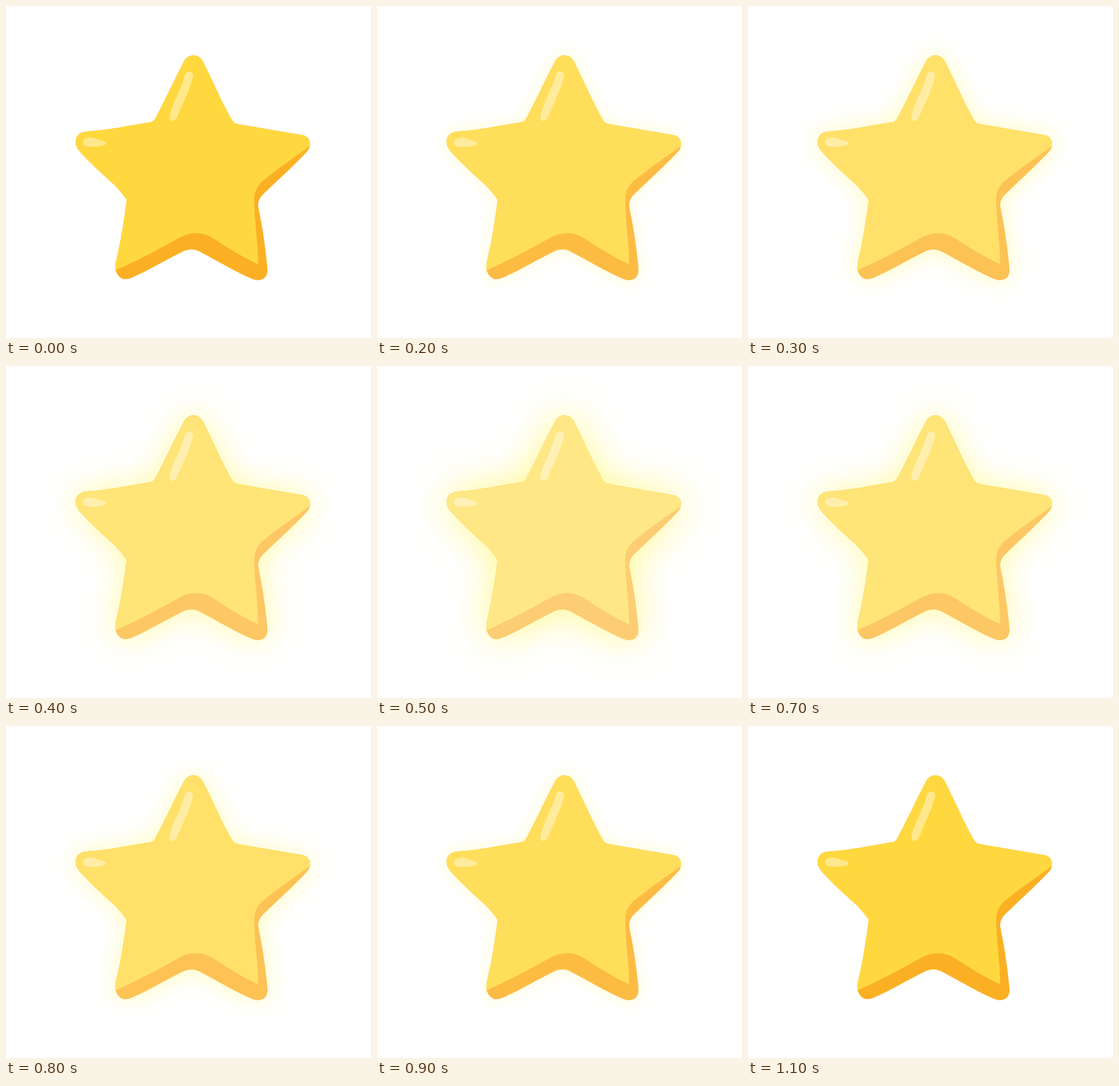
These frames come from a looping animation (550x500 px, 1.15 s). An HTML page with a canvas:

```html
<!DOCTYPE html>
<html lang="en">
<head>
<meta charset="utf-8">
<title>Glowing star</title>
<style>
  html, body { margin: 0; width: 100%; height: 100%; overflow: hidden; background: #fff; }
  canvas { display: block; }
</style>
</head>
<body>
<canvas id="stage" width="550" height="500"></canvas>
<script>
const ctx = document.getElementById('stage').getContext('2d');
const STEP = 50, STEPS = 23, PEAK = 11;

const star = new Path2D(`M267 86 C273 71 291 70 298 86
  C312 114 326 147 340 171 Q343 177 350 178 L444 194
  C455 195 459 202 458 211 Q457 216 452 221
  C434 240 410 262 389 282 Q379 291 380 302
  C386 330 391 362 394 396 C395 411 383 416 371 411
  C345 400 319 384 294 371 Q281 363 268 369
  C243 381 217 397 190 409 C176 415 169 409 165 398
  Q164 391 167 379 C174 350 178 321 182 292
  Q176 283 164 270 C146 254 127 237 111 219
  C100 206 104 190 122 189 C153 187 187 180 217 175
  Q221 175 224 171 C239 144 252 114 267 86 Z`);

const face = new Path2D(`M90 60 H470 V203 L458 211
  C432 230 407 246 384 266 Q374 276 374 291
  C374 323 380 357 380 389 C358 379 335 365 314 351
  C297 340 280 339 263 348 C231 366 199 383 165 398 L90 398 Z`);

const shines = [
  new Path2D(`M269 105 C272 97 281 96 282 105 C279 121 268 143 257 169
    C253 175 246 174 246 168 C248 151 264 126 269 105 Z`),
  new Path2D(`M116 205 C117 200 122 198 128 198 C134 198 139 202 146 203
    C152 204 153 208 147 210 C140 212 132 212 126 212 C120 212 116 209 116 205 Z`)
];

function fill(path, color) {
  ctx.fillStyle = color;
  ctx.fill(path);
}

function draw(glow) {
  ctx.clearRect(0, 0, 550, 500);

  ctx.save();
  ctx.shadowColor = `rgba(255, 245, 90, ${0.75 * glow})`;
  ctx.shadowBlur = 64 * glow;
  fill(star, '#fbb024');
  ctx.restore();

  ctx.save();
  ctx.clip(star);
  fill(face, '#ffd83f');
  ctx.restore();

  for (const shine of shines) fill(shine, 'rgba(255, 255, 255, 0.4)');
  fill(star, `rgba(255, 255, 255, ${0.4 * glow})`);
}

const start = performance.now();
function tick() {
  const step = Math.floor((performance.now() - start) / STEP) % STEPS;
  draw(1 - Math.abs(step - PEAK) / PEAK);
  requestAnimationFrame(tick);
}
tick();
</script>
</body>
</html>
```
